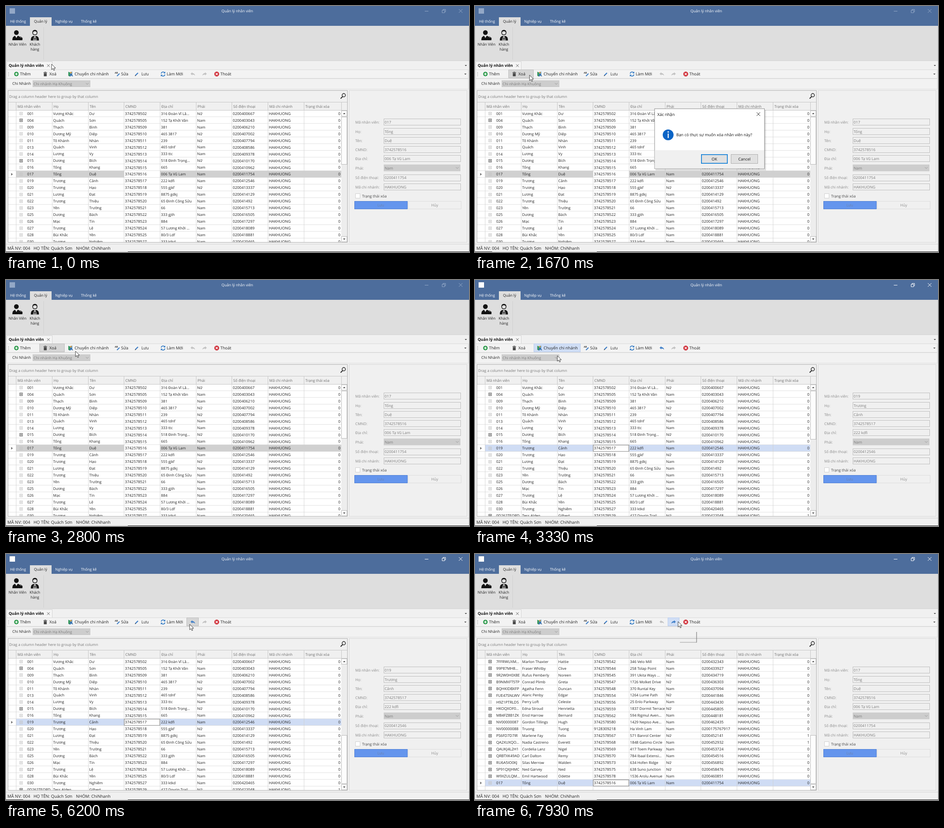
Write an HTML page that moves like this. It is 1026 by 546 pixels and loops after 8000 ms.

```html
<!DOCTYPE html>
<html lang="vi">
<head>
<meta charset="utf-8">
<title>Quản lý nhân viên</title>
<style>
html, body { margin: 0; width: 100%; height: 100%; overflow: hidden; background: #f0f0f0; }
svg { display: block; width: 1026px; height: 546px; }
text { font-family: "Open Sans", "Noto Sans", sans-serif; white-space: pre; text-rendering: geometricPrecision; }
</style>
</head>
<body>
<svg viewBox="0 0 1026 546">
  <defs><clipPath id="gridClip"><rect x="5" y="231" width="738" height="293"/></clipPath></defs>
  <g id="view"></g>
  <path id="cursor" d="M0 0V12.2L2.9 9.6 4.9 14 6.9 13.1 5 8.9H9Z" fill="#fff" stroke="#111" stroke-width=".8"/>
</svg>
<script>
const LOOP = 8000, STEP = 1000 / 15;

// code | surname | name | address | flags (F female, x has children, 1 state) | id | phone length
const parse = s => s.trim().split('\n').map(line => {
  const [code, last, first, addr, flags, id, len] = line.split('|');
  const cmnd = id.length > 3 ? id : '3742578' + id;
  const tail = String(id % 1000 * 7919 + 31337).repeat(3);
  return { code, cells: [last, first, cmnd, addr, flags.includes('F') ? 'Nữ' : 'Nam',
    ('0200' + tail).slice(0, +len || 10), 'HAKHUONG'], open: flags.includes('x'), state: flags.includes('1') ? 1 : 0 };
});

const top20 = parse(`
001|Vương Khắc|Dư|316 Đoàn Vĩ Lâ...|F|502
004|Quách|Sơn|152 Tạ Khởi Vân|x|505
009|Thạch|Bình|381||509
010|Dương Mỹ|Diệp|465 3817|F|510
011|Tô Khánh|Nhàn|239|F|511
013|Quách|Vinh|465 tdnf||512
014|Lương|Vy|333 ttc||513
015|Dương|Bích|518 Đinh Trọng...|Fx|514
016|Tống|Khang|665||515
017|Tống|Duệ|006 Tạ Vũ Lam||516
019|Trương|Cảnh|222 kdfi||517
020|Trương|Hạo|555 gjkf|F|518
021|Lương|Đạt|8875 gdkj||519
022|Trương|Thiệu|65 Đinh Công Sửu||520|9
023|Yên|Trường|66||521
025|Dương|Bách|333 gjth||522
026|Mạc|Tín|884||523
027|Trương|Lệ|57 Lương Khởi ...||524
028|Bùi Khắc|Yên|80/3 Ldf||525
030|Trương|Nghiêm|333 ktkd||527
0D262TEORD|Tess Alden|Gilbert|427 Dovrin Trail|Fx1|529`);

const bottom = parse(`
7FFRWUXM...|Marlon Thaxter|Hattie|346 Velo Mill|x|542
99P87MH8...|Fraser Whitby|Clive|258 Tolap Point|x|544
9R2W0H0X8E|Rufus Pemberly|Noreen|391 Ukita Ways ...|Fx|545
B9NMXFT5TP|Conrad Plimb|Greta|1726 Molket Drive|Fx|547
BQHKIDBXFP|Agatha Fenn|Duncan|370 Runtal Key|x|548
FUE47SNLWV|Alaric Penby|Edgar|1264 Lume Path|Fx|554
H9Z1PTRLDS|Perry Loft|Celeste|25 Enlo Parkway||556
HKOQXOF0...|Edna Stroud|Henrietta|1837 Dormit Terrace|Fx|559
M84FZ8B1ZK|Enid Harrow|Bernard|594 Rigmul Aven...|x|562
NV00000087|Gordon Tillings|Hugh|1429 Nepiso Ave...|x|580
NV00000088|Truong|Tuong|Ha Vinh Lam||9128309218|13
PS6FD7D7IR|Marlene Fay|Felix|571 Banrol Center|Fx1|567
QA2XUXQO...|Nadia Castreno|Everett|1848 Gatimo Circle|x1|568
QAUKJ4L2H1|Cordelia Lanz|Nigel|417 Toem Parkway|x|569
QRBTXK49AD|Carl Dalton|Remy|784 Ibaal Extensi...|x|570
RU6A5IO0KJ|Silas Merrow|Walden|634 Hofen Ridge|Fx|573
SP91QXJHMC|Ned Garvey|Ned|638 Suno Junction|Fx|575
W9XZULQM...|Emil Hartwood|Odette|1536 Arolu Avenue|x|578`);

const row017 = top20[9];
const before = top20.slice(0, 20);
const after = top20.filter(r => r !== row017);
const restored = [...bottom, row017];

// Drawing helpers; text is centred vertically on y
const box = (x, y, w, h, fill, stroke = 'none', sw = 1) => stroke === 'none'
  ? `<rect x="${x}" y="${y}" width="${w}" height="${h}" fill="${fill}"/>`
  : `<rect x="${x + sw / 2}" y="${y + sw / 2}" width="${w - sw}" height="${h - sw}" fill="${fill}" stroke="${stroke}" stroke-width="${sw}"/>`;
const text = (x, y, s, size = 8.2, fill = '#222', extra = '') =>
  `<text x="${x}" y="${y + size * .36}" font-size="${size}" fill="${fill}" ${extra}>${s}</text>`;
const mid = 'text-anchor="middle"', end = 'text-anchor="end"';
const line = (d, color, w = 1) => `<path d="${d}" fill="none" stroke="${color}" stroke-width="${w}"/>`;
const shape = (d, fill) => `<path d="${d}" fill="${fill}"/>`;
const dot = (x, y, r, fill) => `<circle cx="${x}" cy="${y}" r="${r}" fill="${fill}"/>`;
const cross = (x, y, r, color, w = 1) =>
  line(`M${x - r} ${y - r}l${2 * r} ${2 * r}m0 ${-2 * r}l${-2 * r} ${2 * r}`, color, w);

function titleBar(active) {
  const c = active ? '#fff' : '#93a8c7';
  return box(0, 0, 1026, 44, '#4d6d9c') + box(8, 5, 12, 12, c) +
    text(512.5, 11.5, 'Quản lý nhân viên', 8.3, '#fff', mid) +
    line('M928 11.5h8', c) + line('M966.5 9.5h5.5v5.5h-5.5zM968.5 9v-1.5h5.5v5.5h-1.5', c) + cross(1007.5, 11, 4, c) +
    box(53, 25, 48, 19, '#dedede') + text(9, 34.5, 'Hệ thống', 8.2, '#fff') + text(62, 34.5, 'Quản lý') +
    text(109, 34.5, 'Nghiệp vụ', 8.2, '#fff') + text(166, 34.5, 'Thống kê', 8.2, '#fff');
}

function ribbon() {
  return box(0, 44, 1026, 78, '#dedede') + line('M83.5 47V119', '#cfcfcf') + line('M0 121.5H1026', '#d2d2d2') +
    dot(23, 59, 5.2, '#111') + shape('M14 76q0-8 6-10l3 5 3-5q4 1 5 4h-4v6z', '#111') +
    `<rect x="27" y="70" width="9.5" height="6" rx="1" fill="#111"/>` + line('M30 70v-1.5h3.5v1.5', '#111') +
    text(25.5, 85.5, 'Nhân Viên', 8.2, '#222', mid) +
    `<circle cx="64" cy="59.5" r="4.8" fill="#dedede" stroke="#111" stroke-width="1.4"/>` +
    shape('M58.5 59q0-6 5.5-6t5.5 6q-2-3-5.5-3t-5.5 3z', '#111') +
    shape('M55 76.5q0-9 6-10l3 2 3-2q6 1 6 10z', '#111') +
    shape('M60 71l4-2.5 4 2.5zM60.5 71.7h1.2v3h-1.2zM63.4 71.7h1.2v3h-1.2zM66.3 71.7h1.2v3h-1.2zM60 75h8v.9h-8z', '#dedede') +
    text(64, 85.5, 'Khách', 8.2, '#222', mid) + text(64, 96, 'hàng', 8.2, '#222', mid);
}

function hot(x, w, pressed) {
  return pressed ? box(x, 141, w, 19, '#d6d6d6', '#bcbcbc') : box(x, 141, w, 19, '#d0def5', '#b9cdee');
}
const arrow = (x, flip, on) =>
  `<g transform="translate(${x} 151) scale(${flip} 1)">${shape('M-5-.5l4-3.5v2q5 0 6 5.5-2-2.6-6-2.5v2z', on ? '#3f7fc8' : '#c2c2c2')}</g>`;

function toolbar(s) {
  const item = (x, label) => text(x, 151.2, label, 9);
  return box(0, 122, 1026, 424, '#f0f0f0') +
    box(1, 123, 102, 19, '#f5f5f5', '#d4d4d4') + text(6, 132.2, 'Quản lý nhân viên', 8.6, '#111', 'font-weight="700"') +
    cross(94, 132.3, 3, '#555', .9) + shape('M1016.5 131h5l-2.5 2.6z', '#444') +
    box(1, 141, 1024, 20, '#f3f3f3', '#dadada') + shape('M1015.5 150h5l-2.5 2.6z', '#444') +
    [147, 150.5, 154].map(y => box(5, y, 1.4, 1.4, '#999')).join('') +
    (s.del ? hot(74, 56, true) : '') + (s.move ? hot(130, 104) : '') +
    (s.undoHot ? hot(400, 27, s.undoHot > 1) : '') + (s.redoHot ? hot(427, 26) : '') +
    dot(23, 151, 5, '#2c9a4b') + line('M20 151h6M23 148v6', '#fff', 1.6) + item(31, 'Thêm') +
    shape('M83 147h8v1.3h-8zM85.5 146h3v1h-3zM83.8 149h6.4v7h-6.4z', '#4c4c4c') + item(96, 'Xoá') +
    shape('M138 146l4 1.5v9l-4-1.5z', '#3d9a63') + shape('M142 147.5l5-2v9l-5 2z', '#5aa0d8') +
    dot(144, 148, 1.9, '#d99a3b') + line('M141 156l3-5 4 5', '#315f9b', 1.5) + item(152, 'Chuyển chi nhánh') +
    text(241, 148.5, 'AB', 5, '#333', 'font-weight="700"') + line('M246 155.5l5.5-5.5', '#3f7fc8', 2.2) + item(255, 'Sửa') +
    line('M287 154l5.5-5.5', '#3f7fc8', 2.4) + shape('M285.6 155.6l.7-2.5 1.8 1.8z', '#333') + item(300, 'Lưu') +
    line('M343.8 150a4.3 4.3 0 0 1 7.6-2M352.2 152a4.3 4.3 0 0 1-7.6 2', '#2f78c4', 1.6) +
    shape('M353 145.5v4h-4zM343 156.5v-4h4z', '#2f78c4') + item(356, 'Làm Mới') +
    arrow(414, 1, s.undo) + arrow(440, -1, s.redo) +
    dot(467, 151, 5.4, '#d0303a') + cross(467, 151, 2.3, '#fff', 1.5) + item(475, 'Thoát') +
    box(1, 161, 1024, 24, '#f2f2f2', '#dedede') + text(14, 172.2, 'Chi Nhánh', 8.4) +
    box(59, 165, 128, 15, '#cdcdcd') + text(61, 172.5, 'Chi nhánh Hạ Khuông', 8.4, '#7d7d7d') +
    line('M177 171l3 3 3-3', '#999');
}

const cols = [22, 102, 182, 261, 341, 421, 500, 580, 660, 743];
const heads = ['Mã nhân viên', 'Họ', 'Tên', 'CMND', 'Địa chỉ', 'Phái', 'Số điện thoại', 'Mã chi nhánh', 'Trạng thái xóa'];

function gridRow(r, i, selected, active) {
  const y = 231.2 + i * 14.97, c = y + 7.5;
  let out = '';
  if (selected) {
    out += box(22, y, 721, 15, active ? '#cfdcf4' : '#d0d0d0') + shape(`M11.5 ${c - 3}l3.5 3-3.5 3z`, '#666');
    out += active ? box(261.5, y, 80, 15, '#fff', '#8f8f8f') : box(262, y, 79, 15, '#fff');
  }
  const p = r.open ? '#555' : '#c4c4c4';
  out += box(30, c - 3.5, 7, 7, 'none', p) + line(`M31.5 ${c}h4m-2-2v4`, p) + text(47, c, r.code, 8.3);
  r.cells.forEach((v, k) => out += text(cols[k + 1] + 2.6, c, v, /^\d{9,}$/.test(v) || k === 6 ? 8.45 : 8.15));
  return out + text(741, c, r.state, 8.4, '#222', end) + line(`M5 ${y + 14.6}H743`, '#d9d9d9', .8);
}

function grid(s) {
  let out = box(4, 187, 753, 338, '#fff', '#b0b0b0') + box(5, 188, 751, 44, '#f0f0f0') +
    text(7, 200.8, 'Drag a column header here to group by that column', 8.15, '#777') +
    `<circle cx="748.5" cy="198" r="3.7" fill="none" stroke="#222" stroke-width="1.4"/>` + line('M746 201l-4.5 4.5', '#222', 1.8) +
    line('M5 213.5H756M5 231.5H756', '#c6c6c6');
  heads.forEach((h, i) => out += text(cols[i] + 3.6, 223, h, 8.1, '#6c6c6c'));
  out += cols.map(x => line(`M${x + .5} 214V231`, '#c6c6c6')).join('');
  out += '<g clip-path="url(#gridClip)">' + s.rows.map((r, i) => gridRow(r, i, i === s.sel, s.active)).join('') +
    cols.slice(0, 9).map(x => line(`M${x + .5} 231V524`, '#d0d0d0', .8)).join('') + '</g>';
  if (s.active) out += box(261.5, 231.2 + s.sel * 14.97, 80, 15, 'none', '#8f8f8f');
  const [y, h] = s.thumb;
  return out + box(743, 232, 13, 292, '#ededed') + box(743, 232, 13, 13, '#fdfdfd', '#b9b9b9') +
    box(743, 511, 13, 13, '#fdfdfd', '#b9b9b9') + box(743, y, 13, h, '#fdfdfd', '#b9b9b9') +
    shape('M747 240l2.5-3 2.5 3z', '#444') + shape('M747 516l2.5 3 2.5-3z', '#444');
}

function panel(r) {
  const [last, first, cmnd, addr, sex, phone, branch] = r.cells;
  const fields = [['Mã nhân viên', r.code, 257.5], ['Họ', last, 278.3], ['Tên', first, 298.3], ['CMND', cmnd, 318.5],
    ['Địa chỉ', addr, 338.8], ['Phái', sex, 359.3], ['Số điện thoại', phone, 381], ['Mã chi nhánh', branch, 401.3]];
  return box(760, 187, 262, 338, '#f0f0f0', '#d8d8d8') +
    fields.map(([label, v, y]) => text(774, y + .5, label + ':', 8.2, '#8a8a8a') +
      (label === 'Phái' ? box(837, y - 7.5, 170, 15, '#cdcdcd') + line(`M997 ${y - 1.5}l3 3 3-3`, '#999')
        : box(837, Math.round(y - 7.5), 171, 15, '#f0f0f0', '#bdbdbd')) +
      text(839, y + .2, v, 8.45, '#7c7c7c')).join('') +
    box(774, 416, 11, 11, '#fff', '#d0d0d0') + text(789, 421.7, 'Trạng thái xóa', 8.3, '#444') +
    box(772, 433, 118, 18, '#6495ed', '#4f7fd3') + text(830.5, 442.5, 'Lưu', 8.3, '#6d83ad', mid) +
    box(891, 433, 118, 18, '#f0f0f0', '#dcdcdc') + text(950, 442.5, 'Hủy', 8.3, '#8f8f8f', mid);
}

function statusBar() {
  return line('M0 528.5H1026', '#d2d2d2') + text(3, 538, 'MÃ NV: 004', 9.4) + text(61, 538, 'HỌ TÊN: Quách Sơn', 9.3) +
    text(155, 538, 'NHÓM: ChiNhanh', 9.2) + box(0, 545, 1026, 1, '#222') + box(38, 545, 232, 1, '#d8d8d8');
}

function dialog(opacity) {
  return `<g opacity="${opacity}">` + box(400, 231, 245, 134, 'rgba(0,0,0,.12)') +
    box(397.5, 227.5, 244.5, 134, '#fff', '#8a8a8a') + box(398.5, 320, 242.5, 40.5, '#f0f0f0') +
    text(404, 240.5, 'Xác nhận', 9, '#111') + cross(628, 240, 4, '#333') +
    dot(428, 286, 12, '#0a64c6') + box(427, 283, 2.2, 10, '#fff') + dot(428.1, 279.5, 1.5, '#fff') +
    text(446, 286, 'Bạn có thực sự muốn xóa nhân viên này?', 8.8, '#111') +
    box(501, 329, 59, 21, '#e1e1e1', '#0078d7', 1.6) + text(530.5, 339.5, 'OK', 8.9, '#111', mid) +
    box(567, 329, 60, 21, '#e1e1e1', '#adadad') + text(597, 339.5, 'Cancel', 8.8, '#111', mid) + '</g>';
}

const tipEdge = () => line('M454 196H491', '#999', 1.2) + line('M491 173V196.5', '#777', 1.2);

// Window states: each step overrides the ones before it
const steps = [
  [0, { rows: before, sel: 9, who: row017, active: 0, thumb: [246, 106], undo: 0, redo: 0,
        del: 0, move: 0, undoHot: 0, redoHot: 0, dialog: 0, tip: 0 }],
  [1200, { active: 1, del: 1 }],
  [1270, { active: 0 }],
  [1330, { dialog: .6 }],
  [1400, { dialog: 1 }],
  [2470, { dialog: .5 }],
  [2530, { dialog: 0 }],
  [2870, { rows: after, who: after[9], active: 1, del: 0, undo: 1, thumb: [246, 108] }],
  [3270, { move: 1 }],
  [3400, { move: 0 }],
  [5400, { undoHot: 1 }],
  [5800, { undoHot: 2 }],
  [6200, { thumb: [402, 108] }],
  [6270, { rows: restored, sel: 18, who: row017, undo: 0, redo: 1, undoHot: 0 }],
  [7270, { redoHot: 1 }],
  [7930, { tip: 1 }]
];

// Pointer stops: time, x, y
const path = [[0, 101, 129], [70, 99, 127], [270, 88, 141], [470, 97, 148], [1400, 97, 148], [2000, 150, 160],
  [2200, 150, 162], [2400, 152, 161], [2600, 152, 161], [2800, 154, 158], [3200, 154, 158], [3470, 213, 179],
  [4670, 213, 179], [4730, 234, 174], [5200, 362, 162], [5530, 407, 156], [7070, 407, 156], [7530, 450, 150], [LOOP, 450, 150]];

function pointer(t) {
  const i = path.findIndex(p => p[0] > t);
  const [t0, x0, y0] = path[i - 1], [t1, x1, y1] = path[i];
  const k = (t - t0) / (t1 - t0);
  return [x0 + (x1 - x0) * k, y0 + (y1 - y0) * k];
}

const view = document.getElementById('view'), cursor = document.getElementById('cursor');
let shown = -1;

function draw() {
  const t = performance.now() % LOOP;
  const n = steps.filter(p => p[0] <= t).length;
  if (n !== shown) {
    shown = n;
    const s = Object.assign({}, ...steps.slice(0, n).map(p => p[1]));
    view.innerHTML = titleBar(s.active) + ribbon() + toolbar(s) + grid(s) + panel(s.who) + statusBar() +
      (s.dialog ? dialog(s.dialog) : '') + (s.tip ? tipEdge() : '');
  }
  const tick = Math.min(Math.round(Math.floor((t + 4) / STEP) * STEP / 10) * 10, LOOP - 10);
  cursor.setAttribute('transform', `translate(${pointer(tick).join(' ')})`);
  requestAnimationFrame(draw);
}
draw();
</script>
</body>
</html>
```
